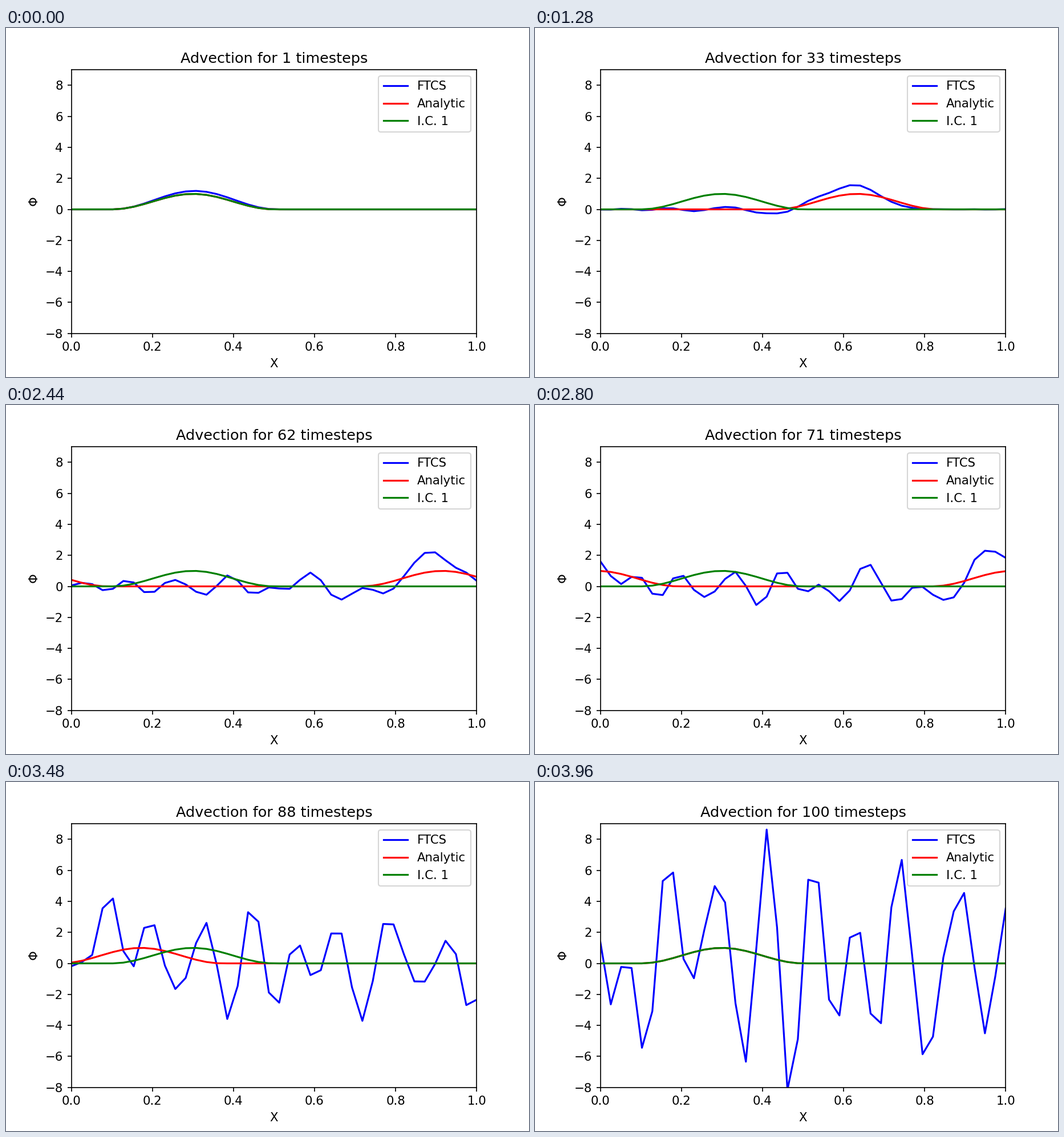
Animation of 917x611 px, one loop 4 s. Source, as a matplotlib script:

```python
import numpy as np
import matplotlib.pyplot as plt
from matplotlib.animation import FuncAnimation

W, H, DPI = 917, 611, 152.8
NX, STEPS, C = 40, 100, 0.4

plt.rcParams["font.family"] = "DejaVu Sans"


def bell(x, a=0.1, b=0.5):
    hump = 0.5 * (1 - np.cos(2 * np.pi * (x - a) / (b - a)))
    return np.where((x > a) & (x < b), hump, 0)


def ftcs(start, steps):
    """March forward in time, centred in space, on a periodic grid.

    The sweep reads its right neighbour from the array being filled, which
    starts at zero, so the first step amplifies the wave.
    """
    old, new, out = start.copy(), np.zeros(NX), []
    for _ in range(steps):
        for j in range(NX):
            new[j] = old[j] - C / 2 * (new[(j + 1) % NX] - old[j - 1])
        old = new.copy()
        out.append(old)
    return out


x = np.linspace(0, 1, NX)
phi0 = bell(x)
waves = ftcs(phi0, STEPS)

fig = plt.figure(figsize=(W / DPI, H / DPI), dpi=DPI, facecolor="white")
ax = fig.add_axes([0.125, 0.125, 0.775, 0.755])
numeric, = ax.plot(x, waves[0], color="blue", label="FTCS")
exact, = ax.plot(x, phi0, color="red", label="Analytic")
ax.plot(x, phi0, color="green", label="I.C. 1")
ax.set(xlim=(0, 1), ylim=(-8, 9), xlabel="X", ylabel=r"$\Phi$")
ax.legend(loc="upper right")
title = ax.set_title("Advection for 1 timesteps")


def draw(i):
    n = i + 1
    numeric.set_ydata(waves[i])
    # whole-cell shift; the offset guards against rounding below an integer
    exact.set_ydata(np.roll(phi0, int(C * n + 1e-9)))
    title.set_text(f"Advection for {n} timesteps")
    return numeric, exact, title


anim = FuncAnimation(fig, draw, frames=STEPS, interval=40, repeat=True,
                     repeat_delay=0, init_func=lambda: draw(0))
plt.show()
```
